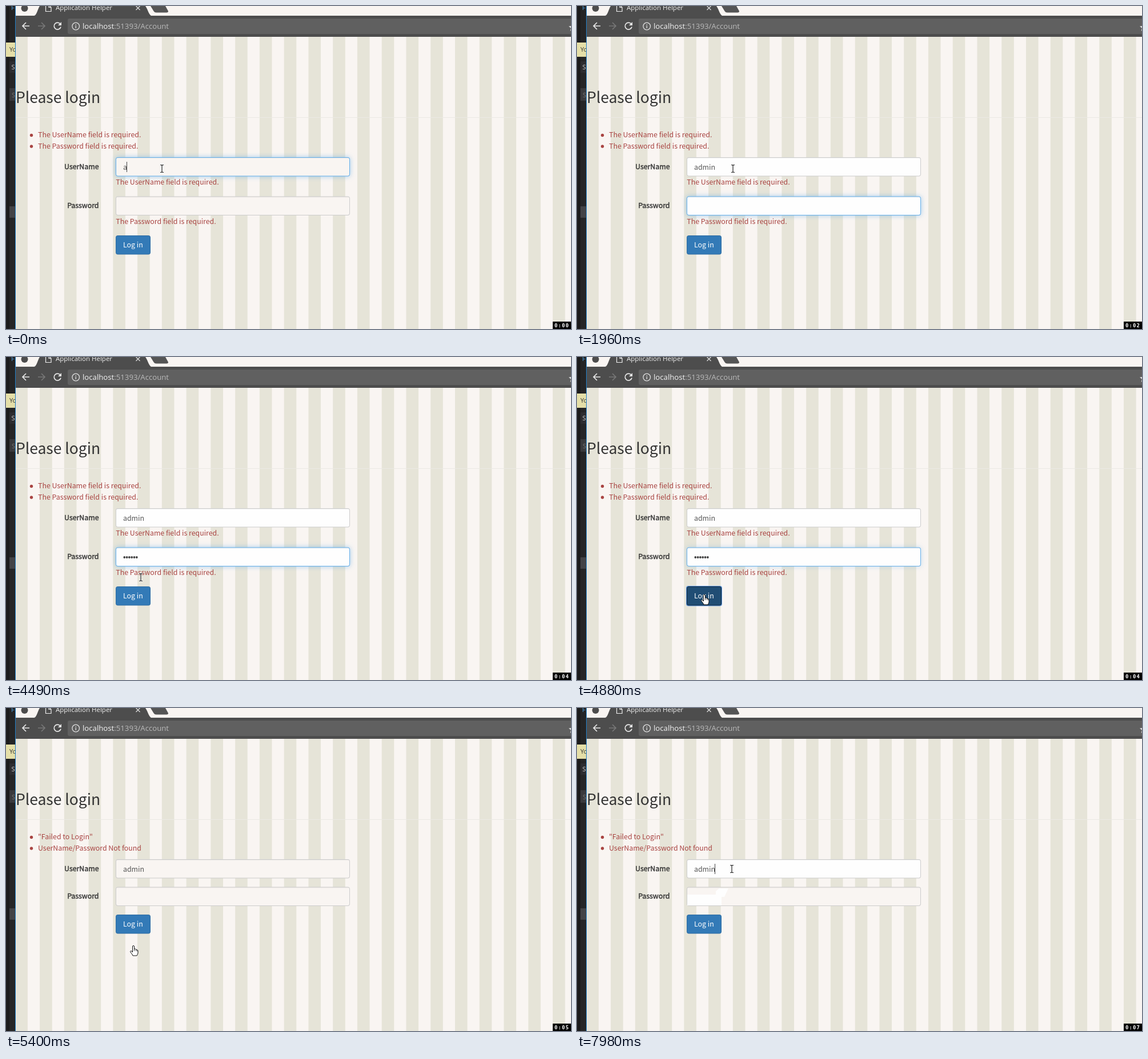
An HTML page with a canvas for the animation above (8000 ms loop, 989 px wide and 566 px high).

```html
<!DOCTYPE html>
<html lang="en">
<head>
<meta charset="utf-8">
<title>Login form</title>
<style>
  html, body { margin: 0; width: 100%; height: 100%; overflow: hidden; }
  canvas { display: block; }
</style>
</head>
<body>
<canvas id="stage" width="989" height="566"></canvas>
<script>
const LOOP = 8000;
const PAGE = '"Noto Sans CJK SC", "Noto Sans CJK JP", "Noto Sans CJK", sans-serif';
const UI = '"Open Sans", "Noto Sans", sans-serif';
const MONO = '"DejaVu Sans Mono", monospace';
const PAPER = '#f9f5f2', RED = '#a94442', INK = '#333';
const ROW = 33.5, GAP = 15, NOTE = 20;
const c = document.getElementById('stage').getContext('2d');

// Each track is a list of [start time, ...values].
const tracks = {
  letters: [[0, 1], [250, 2], [520, 3], [650, 4], [780, 5]],
  dots: [[0, 0], [2290, 1], [2470, 2], [2740, 3], [2860, 4], [3110, 5], [3390, 6], [5270, 0]],
  seconds: [[0, 0], [930, 1], [1960, 2], [2980, 3], [3970, 4], [5030, 5], [6050, 6], [7170, 7]],
  caret: [[0, 'user'], [1080, 'pass'], [1520, ''], [2100, 'pass'], [3820, ''],
    [4350, 'pass'], [4480, ''], [7980, 'user']],
  glow: [[0, 'user', 1], [1080, 'pass', .5], [1220, 'pass', 1], [4880, 'pass', .6], [5030, '', 0]],
  button: [[0, '#337ab7', '#2e6da4'], [4620, '#286090', '#204d74'], [4880, '#204d74', '#122b40'],
    [5030, '#286090', '#204d74'], [5270, '#337ab7', '#2e6da4'], [5930, '#286090', '#204d74'],
    [6050, '#337ab7', '#2e6da4']],
  mouse: [[0, 273, 285, 'beam'], [4080, 271, 291, 'beam'], [4220, 264, 312, 'beam'],
    [4350, 250, 350, 'beam'], [4480, 236, 386, 'beam'], [4620, 226, 418, 'hand'],
    [4750, 224, 425, 'hand'], [5800, 227, 414, 'hand'], [5930, 240, 385, 'hand'],
    [6050, 247, 334, 'beam'], [6170, 247, 327, 'beam'], [7170, 249, 325, 'beam'],
    [7300, 253, 323, 'beam'], [7430, 259, 320, 'beam'], [7560, 265, 304, 'beam'],
    [7700, 270, 288, 'beam'], [7830, 271, 282, 'beam']]
};
const at = (name, t) => tracks[name].findLast(step => step[0] <= t).slice(1);

function rect(x, y, w, h, color) {
  c.fillStyle = color;
  c.fillRect(x, y, w, h);
}

function round(x, y, w, h, r, color) {
  c.fillStyle = color;
  c.beginPath();
  c.roundRect(x, y, w, h, r);
  c.fill();
}

function disc(x, y, r, color) {
  c.fillStyle = color;
  c.beginPath();
  c.arc(x, y, r, 0, 7);
  c.fill();
}

function shape(d, fill, stroke, width = 1) {
  const path = new Path2D(d);
  if (fill) { c.fillStyle = fill; c.fill(path); }
  if (stroke) { c.strokeStyle = stroke; c.lineWidth = width; c.stroke(path); }
}

function text(s, x, y, color, size = 12.35, family = PAGE, weight = '') {
  c.font = `${weight} ${size}px ${family}`;
  c.fillStyle = color;
  c.fillText(s, x, y);
}

function label(s, y) {
  c.textAlign = 'right';
  text(s, 162.5, y, INK);
  c.strokeStyle = INK;
  c.lineWidth = .4;
  c.strokeText(s, 162.5, y);
  c.textAlign = 'left';
}

function editor() {
  rect(0, 0, 16, 566, '#252526');
  rect(0, 0, 6, 566, '#1c1c1d');
  text('F', 9, 7, '#4a9bd8', 11.5, UI);
  rect(0, 64, 16, 25, '#e5dfa8');
  text('Yo', 6, 80, '#333', 11, UI);
  rect(6, 97, 10, 20, '#2d2d30');
  text('S', 9.5, 111, '#d0d0d0', 11, UI);
  rect(6, 144, 10, 22, '#3a3a3d');
  text('S', 10, 160, '#777', 11, UI);
  rect(6, 351, 10, 20, '#434346');
  rect(16, 0, 1, 566, '#1f7ec8');
}

function browser() {
  rect(17, 0, 972, 17, PAPER);
  disc(32.5, 4, 6, '#4d4d4d');
  shape('M48 17.5C54 17 55 6 59 0H244C249 7 250 17 256 17.5Z', '#4d4d4d');
  shape('M253 0H279L284 9Q284 11.500 281 11.500H263Q260 11.500 258.500 9Z', '#555');
  rect(17, 17, 972, 37, '#4d4d4d');
  round(108, 22, 890, 27, 3, '#606060');
  shape('M69.500-2V9.500H79V2.500L75-2M75-2V2.500H79', null, '#eee', 1.2);
  text('Application Helper', 87, 7, '#f2f2f2', 11.5, UI);
  shape('M227.500 0l7 7m0-7l-7 7', null, '#ddd', 1.3);
  shape('M41 35H29.500M35 29l-6 6 6 6', null, '#e8e8e8', 1.7);
  shape('M56 35H67.500M62 29l6 6-6 6', null, '#777', 1.7);
  shape('M95 31.500A6 6 0 1 0 96 36.500', null, '#e8e8e8', 1.7);
  shape('M97 28V34H91Z', '#e8e8e8');
  shape('M128.500 35.500a6.300 6.300 0 1 0-12.600 0a6.300 6.300 0 1 0 12.600 0M122.200 34.500V39M122.200 32V33.500',
    null, '#e0e0e0', 1.3);
  text('localhost', 134, 40, '#f4f4f4', 13.2, UI);
  text(':51393/Account', 134 + c.measureText('localhost').width, 40, '#bbb', 13.2, UI);
  shape('M992 29l-2 6-5 .5 4 3.500-1.500 5 4.500-3Z', '#ddd');
}

function wallpaper() {
  rect(17, 54, 972, 512, PAPER);
  for (let x = 16.3; x < 989; x += 42.76) {
    const left = Math.max(x, 17);
    rect(left, 54, x + 21.6 - left, 512, '#e6e4d8');
  }
  rect(17, 195, 972, 1, '#ebe9e4');
}

function field(y, fill, glow) {
  c.save();
  if (glow) {
    c.shadowColor = `rgba(102,175,233,${.6 * glow})`;
    c.shadowBlur = 8;
  }
  round(192, y, 410, ROW, 4, glow ? '#66afe9' : '#ccc');
  c.restore();
  round(193, y + 1, 408, ROW - 2, 3, fill);
  rect(195, y + 1, 404, 1, 'rgba(0,0,0,.05)');
}

function caret(x, y) {
  rect(Math.floor(x) - 1, y, 1, 18, '#444');
}

function pointer(x, y, kind) {
  c.save();
  c.translate(x, y);
  if (kind === 'beam') {
    const beam = 'M-3-6.500H-1L0-5.500L1-6.500H3M0-5.500V5.500M-3 6.500H-1L0 5.500L1 6.500H3';
    shape(beam, null, '#fff', 2.6);
    shape(beam, null, '#222', 1.2);
  } else {
    shape('M-2.500 3V-7Q-2.500-8.500-1-8.500T.5-7V-2.500Q2.500-4 3.500-1.800Q5.300-2.500 5.800-.8Q7-1 7 1V4Q7 6 5 9H-2' +
      'Q-3 6-6 3Q-7 1-5.500.5Q-4 .5-2.500 3Z', '#fff', '#111');
    shape('M.5-2.500V1M3.500-1.800V1M5.800-.8V1.500', null, '#111', .8);
  }
  c.restore();
}

function draw(t) {
  const failed = t >= 5270;
  const pitch = ROW + GAP + (failed ? 0 : NOTE);
  const userY = 265, passY = userY + pitch, buttonY = passY + pitch;
  const [focus, glow] = at('glow', t);
  const edited = t >= 1080 && !failed;
  const name = 'admin'.slice(0, at('letters', t)[0]);
  const [dots] = at('dots', t);
  const [blink] = at('caret', t);

  editor();
  wallpaper();
  browser();
  text('Please login', 17, 170, INK, 26.45);

  const errors = failed
    ? ['"Failed to Login"', 'UserName/Password Not found']
    : ['The UserName field is required.', 'The Password field is required.'];
  errors.forEach((line, i) => {
    disc(44.5, 226.5 + 19.5 * i, 2.7, RED);
    text(line, 56, 230 + 19.5 * i, RED);
    if (!failed) text(line, 192.3, 313 + pitch * i, RED);
  });

  label('UserName', userY + 21.3);
  label('Password', passY + 20.8);
  field(userY, edited || t >= 7980 ? '#fefefe' : PAPER, focus === 'user' && glow);
  field(passY, edited ? '#fefefe' : PAPER, focus === 'pass' && glow);
  if (t >= 6050) rect(193, 327, 60, 19, '#fefefe');
  if (t >= 7430) shape('M243 328V321L249 316H265L258 331H243Z', '#fefefe');

  text(name, 205, 287, '#555');
  if (blink === 'user') caret(205.5 + c.measureText(name).width, 273);
  for (let i = 0; i < dots; i++) disc(207.3 + 4.3 * i, 351, 1.9, '#444');
  if (blink === 'pass') caret(206 + 4.3 * dots, 341);

  const [fill, edge] = at('button', t);
  if (t >= 4880 && !failed) round(191, buttonY - 1, 63, ROW + 2, 4, '#5b94dc');
  round(192, buttonY, 61, ROW, 4, edge);
  round(193, buttonY + 1, 59, ROW - 2, 3, fill);
  text('Log in', 205, buttonY + 21.2, '#fff');

  pointer(...at('mouse', t));

  rect(957, 553, 32, 13, '#000');
  c.letterSpacing = '1.1px';
  text(`0:0${at('seconds', t)[0]}`, 960, 563, '#fff', 9, MONO, 'bold');
  c.letterSpacing = '0px';
}

function tick() {
  draw(performance.now() % LOOP);
  requestAnimationFrame(tick);
}
tick();
</script>
</body>
</html>
```
